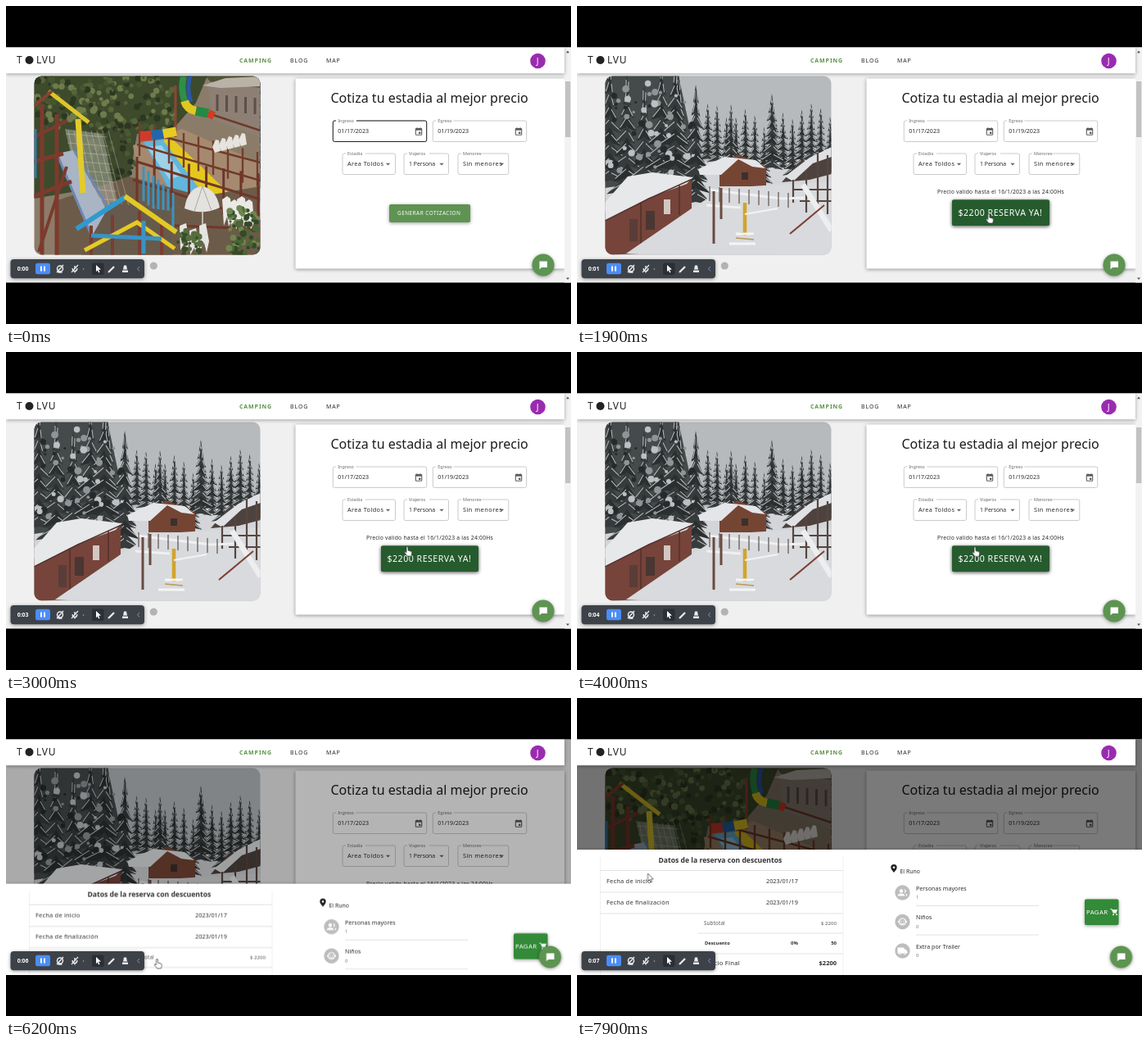
Write an HTML page that moves like this. It is 690 px wide and 388 px high and loops after 8000 ms.

```html
<!DOCTYPE html>
<html lang="es">
<head>
<meta charset="utf-8">
<title>Reserva</title>
<style>
html, body { margin: 0; width: 100%; height: 100%; overflow: hidden; background: #000; }
svg { display: block; width: 690px; height: 388px; font-family: "Noto Sans", "Open Sans", sans-serif; }
text { white-space: pre; }
.soft { filter: drop-shadow(0 1px 2px rgba(0,0,0,.4)); }
.bar { filter: drop-shadow(0 1px 2px rgba(0,0,0,.35)); }
</style>
</head>
<body>
<svg id="stage" viewBox="0 0 690 388"></svg>
<script>
const LOOP = 8000;

let seed = 11;
const rnd = (a = 0, b = 1) => {
  seed = (seed * 16807) % 2147483647;
  return a + (b - a) * seed / 2147483647;
};
const many = (n, fn) => Array.from({ length: n }, (_, i) => fn(i)).join('');

const area = (d, fill) => `<path d="${d}" fill="${fill}"/>`;
const line = (d, color, w = 1) => `<path d="${d}" fill="none" stroke="${color}" stroke-width="${w}"/>`;
const box = (x, y, w, h, fill, r = 0, more = '') =>
  `<rect x="${x}" y="${y}" width="${w}" height="${h}" rx="${r}" fill="${fill}" ${more}/>`;
const dot = (x, y, r, fill) => `<circle cx="${x}" cy="${y}" r="${r}" fill="${fill}"/>`;
const text = (x, y, size, str, { ls = 0, fill = '#2b2b2b', w = 400, end = false } = {}) =>
  `<text x="${x}" y="${y}" font-size="${size}" font-weight="${w}" fill="${fill}" letter-spacing="${ls}"
    ${end ? 'text-anchor="end"' : ''}>${str}</text>`;
const group = (id, body, more = '') => `<g id="${id}" ${more}>${body}</g>`;

// ---- carousel pictures ----
const leaves = (n, x0, y0, x1, y1, colors) => many(n, i =>
  dot(rnd(x0, x1).toFixed(1), rnd(y0, y1).toFixed(1), rnd(1.5, 4.5).toFixed(1), colors[i % colors.length]));

function posts(n, x0, y0, x1, y1, h, color, w) {
  const at = (a, b, i) => a + (b - a) * i / (n - 1);
  return line(many(n, i => `M${at(x0, x1, i)} ${at(y0, y1, i)}v${h}`), color, w);
}

const summer = () =>
  box(34, 85, 277, 219, '#8b7c69') +
  area('M34 85H246L232 118 206 148 160 156 150 215 34 235Z', '#3d4a2c') +
  leaves(190, 36, 87, 205, 150, ['#55653a', '#2c3821', '#6e7b4b', '#46552f']) +
  leaves(60, 100, 140, 160, 215, ['#2a3420', '#4a5833', '#38442a']) +
  area('M243 85H311V100L250 93Z', '#4c5537') +
  area('M246 92 311 100V160L252 138Z', '#8d7f73') +
  area('M240 97 268 88 311 86V98L262 100Z', '#bbb2a7') +
  posts(5, 258, 108, 304, 112, 20, '#5d4f48', 3) +
  area('M155 170 215 150 311 192V260H170Z', '#a58a70') +
  area('M168 166 194 163 247 232 226 246 206 236Z', '#62b5dc') +
  area('M172 172 190 170 215 206 200 212Z', '#9dd2e8') +
  area('M192 164 202 161 278 234 262 247 240 228Z', '#e4c81e') +
  line('M160 151 311 191M160 169 311 213M244 130 311 152', '#6d3a29', 2.4) +
  posts(9, 163, 141, 307, 178, 42, '#743d2b', 2.4) +
  many(5, i => area(`M${252 + i * 8} ${172 - i * 2}l4-9 4 1 2 13-7 2Z`, '#e6e4de')) +
  line('M217 86Q213 101 218 116', '#2e8f47', 8) +
  line('M225 85Q220 103 226 117', '#2857a8', 5) +
  line('M218 116Q221 126 232 128', '#e0c81f', 10) +
  line('M232 128 247 131', '#238a43', 11) +
  line('M247 131 254 134', '#cf3d27', 10) +
  line('M207 97V160', '#8d4632', 3) +
  line('M164 159 178 158', '#cf3b2b', 12) +
  line('M178 158 192 156', '#2465ad', 12) +
  line('M192 156 208 153', '#e5cb22', 11) +
  area('M60 238 150 208 240 232 311 220V304H60Z', '#6d5b49') +
  line('M160 190 311 236M155 212 311 262M205 268 311 272', '#70382a', 3) +
  posts(8, 160, 184, 308, 204, 56, '#6d3528', 3) +
  posts(7, 168, 196, 204, 228, 42, '#3a93c2', 3) +
  area('M72 150 118 156 136 240 96 252Z', 'rgba(190,190,180,.45)') +
  line(many(8, i => `M${76 + i * 7} 152l${18 + i} 92M${73 + i * 2} ${156 + i * 11}l50 4`), 'rgba(220,220,210,.45)', .8) +
  area('M62 180 82 176 138 276 112 298Z', '#a9b4c4') +
  line('M62 180 112 298M83 176 140 272', '#6d88b4', 3) +
  line('M44 120V304M62 132V304M34 190 70 180M34 232 80 214', '#7d3a2d', 5) +
  line('M34 160 75 140M40 300 74 196', '#7d3a2d', 4) +
  line('M52 104 101 142', '#dfc52a', 5) +
  line('M88 138 94 228', '#e2cb2c', 7) +
  line('M34 122 56 104', '#8a402f', 4) +
  line('M36 150V210', '#3777a8', 3) +
  area('M128 240 200 250 204 304H92Z', '#665a4c') +
  line('M104 268V304M130 255V304M163 250V304M190 266V304', '#7a3d30', 4) +
  line('M86 272 146 233', '#2f9ad0', 6) +
  line('M145 232 208 276', '#e3c926', 6) +
  line('M96 298 160 264 206 296', '#e5ca25', 5) +
  line('M104 280 190 284M168 262V302', '#3a93c4', 5) +
  area('M218 247Q222 221 240 220 257 224 261 246Q240 256 218 247Z', '#e3e2df') +
  line('M240 220 230 250M240 220 251 250', '#aaa9a6', 1) +
  line('M240 250V290', '#d8d8d4', 1.5) +
  many(4, i => area(`M${264 + i * 9} ${236 + (i % 2) * 4}l6-4 4 3 2 25-4 9-2-12-4 11Z`, '#e9e9e6')) +
  many(3, i => area(`M${212 + i * 12} ${268 + (i % 2) * 6}l8-3 4 22-3 14-3-12-5 9Z`, '#e4e4e0')) +
  leaves(95, 272, 246, 310, 303, ['#4d6536', '#6f8650', '#35492a']) +
  leaves(32, 208, 272, 238, 303, ['#566d3d', '#3a4c2b']);

function fir(x, top, h, w) {
  const tiers = 9;
  return many(tiers, i => {
    const y = top + h * i / tiers, half = w * (i + 1.4) / tiers / 2, d = h / tiers * 1.5;
    const l = x - half * rnd(.75, 1.1), r = x + half * rnd(.75, 1.1);
    return area(`M${x} ${y}L${r} ${y + d}L${x} ${y + d * .8}L${l} ${y + d * .95}Z`, i % 2 ? '#2b2f30' : '#373b3b') +
      line(`M${x - 1} ${y + d * .3}L${l + 2} ${y + d * .8}M${x + 2} ${y + d * .4}L${r - 2} ${y + d * .85}`, '#b3b7ba', 1.1);
  });
}

const winter = () =>
  box(34, 85, 277, 219, '#b6babd') +
  area('M34 205 150 190 311 185V304H34Z', '#d3d5d8') +
  many(15, i => fir(148 + i * 11.5, rnd(118, 148), 66, 24)) +
  fir(238, 107, 88, 32) + fir(188, 120, 74, 26) +
  area('M34 85H124L140 160 148 206 34 222Z', '#454a4b') +
  many(6, i => fir(40 + i * 21, 70 + (i % 3) * 13, 140, 46)) +
  fir(120, 76, 132, 54) +
  leaves(60, 36, 90, 142, 205, ['#bcc0c3', '#262a2b', '#8f9497']) +
  area('M174 194 196 181 231 196V220H174Z', '#754534') +
  area('M148 199 180 184 218 188 230 198 214 196 197 187 176 206 150 206Z', '#e3e5e8') +
  box(201, 203, 8, 9, '#3c302d') +
  area('M34 252 86 231 140 211V247L76 302 34 304Z', '#76443a') +
  area('M34 240 62 208 92 203 141 209 134 217 88 234 34 262Z', '#e6e8ea') +
  line('M34 262 88 235 141 211', '#54342f', 1.4) +
  box(84, 250, 11, 23, '#4a3633') + box(106, 236, 8, 18, '#d2c7c1') + box(64, 260, 10, 27, '#593d38') +
  line('M78 240V297M125 219V255', '#51302a', 1.5) +
  area('M60 302 140 247 180 222 311 214V304Z', '#d8dadd') +
  area('M250 215 272 190 311 184V205L284 212Z', '#4d423e') +
  area('M254 208 284 185 311 172V184L288 192 264 214Z', '#dfe1e4') +
  line('M264 212V240M280 200V252M294 180V247M306 182V254M264 224H311M272 238H311', '#574640', 2.2) +
  line('M276 218 311 274', '#eceef0', 7) +
  line('M160 224 250 235 278 234M158 243 200 246', '#eff0f2', 3) +
  posts(9, 162, 220, 258, 228, 18, '#6a5b54', 1.3) +
  line('M167 226V290M176 222V260', '#6b4a40', 3) +
  line('M205 240V280', '#d0a52c', 4.5) +
  line('M194 283 216 285M200 277 216 279', '#b99a52', 1.5) +
  line('M186 290H218M194 278H216', '#f5f5f6', 3) +
  line('M260 278 302 243', '#7d4136', 2) +
  line('M205 254 245 247', '#f2f3f4', 2);

// ---- page parts ----
function field(x, y, w, label, value, o = {}) {
  return box(x, y, w, 25.5, 'none', 2, 'stroke="#c6c6c6" stroke-width=".9"') +
    box(x + 4, y - 2, label.length * 3 + 3, 4, '#fff') +
    text(x + 6, y + 1.6, 5.4, label, { fill: '#6b6b6b' }) +
    text(x + 6, y + 15.2, o.size || 7.1, value, { ls: o.ls || 0 });
}
const calendar = (x, y) =>
  box(x - 3.7, y - 3.5, 7.4, 7.8, 'none', .8, 'stroke="#5c5c5c" stroke-width="1.1"') +
  box(x - 3.7, y - 3.5, 7.4, 2.2, '#5c5c5c') + box(x, y + .6, 2.4, 2.4, '#5c5c5c') +
  line(`M${x - 2} ${y - 4.8}v2M${x + 2} ${y - 4.8}v2`, '#5c5c5c');
const caret = (x, y) => area(`M${x - 2.6} ${y - 1.2}h5.2l-2.6 2.7Z`, '#666');

const form =
  box(353.5, 88.5, 328.5, 232, '#fff', 1, 'class="soft"') +
  text(396.5, 117.5, 16, 'Cotiza tu estadia al mejor precio', { fill: '#1c1c1c' }) +
  field(399.3, 140, 114.4, 'Ingreso', '01/17/2023') + calendar(504, 153) +
  group('focus', line('M403 140h-1.7q-2 0-2 2v21.500q0 2 2 2h110.400q2 0 2-2v-21.500q0-2-2-2H428', '#222', 1)) +
  field(521.3, 140, 114.4, 'Egreso', '01/19/2023') + calendar(626, 153) +
  field(411, 180, 64.500, 'Estadia', 'Area Toldos', { size: 7.3, ls: .4 }) + caret(466.5, 193) +
  field(486, 180, 54.5, 'Viajeros', '1 Persona', { size: 6.9 }) + caret(532, 193) +
  field(552, 180, 61.8, 'Menores', 'Sin menores', { size: 7.4, ls: .45 }) + caret(605.5, 193);

const quoteText = text(478, 255, 6.4, 'GENERAR COTIZACION', { fill: '#fff', w: 500, ls: .5 });
const quoteBtn = color => box(468, 242, 99, 22, color, 2, 'class="soft"') + quoteText;
const bookBtn = color => box(458, 236.5, 119, 31.5, color, 2, 'class="soft"') +
  text(465.5, 256.2, 10.6, '$2200 RESERVA YA!', { fill: '#fff', ls: .5 });
const GREEN = '#5f9352', DARK = '#265b2e';

const buttons =
  group('quote', quoteBtn(GREEN)) + group('quoteOver', quoteBtn(DARK)) +
  group('book', text(440, 229, 6.8, 'Precio valido hasta el 16/1/2023 a las 24:00Hs', { ls: .22 }) + bookBtn(GREEN)) +
  group('bookOver', bookBtn(DARK));

const header =
  box(0, 50.5, 682, 31.700, '#fff', 0, 'class="bar"') +
  text(13, 70.3, 12, 'T', { fill: '#222' }) + dot(28.5, 66, 5, '#222') + text(37, 70.3, 12, 'LVU', { fill: '#222', ls: .8 }) +
  text(285, 69, 7, 'CAMPING', { fill: '#5d9147', w: 700, ls: .9 }) +
  text(347, 69, 7, 'BLOG', { ls: .9 }) + text(391, 69, 7, 'MAP', { ls: .9 }) +
  dot(649.5, 67, 9.3, '#9a2bb0') + text(647.8, 70.8, 10.5, 'J', { fill: '#fff' });

const scrollbar =
  box(682, 50.5, 8, 287, '#f2f2f2') + box(683, 92, 6.3, 68, '#c2c2c2') +
  area('M684 57.200h4l-2-2.600Z', '#555') + area('M684 331.500h4l-2 2.600Z', '#555');

// ---- booking drawer ----
const rule = (x0, x1, y) => line(`M${x0} ${y}H${x1}`, '#dfdfdf', .9);
const item = (y, label, n, icon) =>
  dot(397.5, y, 9.2, '#bdbdbd') + `<g transform="translate(397.500 ${y})">${icon}</g>` +
  text(414, y - 2.7, 7, label, { ls: .08 }) + text(414, y + 7.5, 6, n, { fill: '#777' });
const people = dot(-1.5, -2, 2.2, '#fff') + area('M-6 4Q-5.500 1-1.500 1T3 4Z', '#fff') + line('M2.500-3.800Q5-2 2.500 0M4.500 1.500 5.500 4', '#fff', 1.2);
const child = line('M-4 0A4 4 0 1 1 4 0A4 4 0 1 1-4 0M-2 1.600Q0 3.200 2 1.600', '#fff', 1.2) +
  dot(-1.6, -.7, .7, '#fff') + dot(1.6, -.7, .7, '#fff') + dot(-4.6, 0, 1.1, '#fff') + dot(4.6, 0, 1.1, '#fff');
const truck = area('M-6-4H2V-2H4L6 1V3H-6Z', '#fff') + dot(-3, 3, 1.6, '#fff') + dot(3, 3, 1.6, '#fff') +
  dot(-3, 3, .7, '#bdbdbd') + dot(3, 3, .7, '#bdbdbd');
const row = { ls: .18, fill: '#333' }, small = { ls: .2, fill: '#555' };

const drawer =
  box(0, 185, 690, 153, '#fff', 0, 'class="soft"') +
  text(99.5, 200.500, 8.6, 'Datos de la reserva con descuentos', { w: 700, fill: '#333' }) +
  line('M28.500 194V338M325 194V338', '#f0f0f0', .9) +
  rule(28, 325, 210.5) + rule(28, 325, 237) + rule(28, 325, 263) + rule(148, 325, 287) + rule(148, 325, 312) +
  text(36, 225.7, 7.5, 'Fecha de inicio', row) + text(231, 225.7, 7.3, '2023/01/17', { fill: '#333' }) +
  text(36, 252, 7.5, 'Fecha de finalización', row) + text(231, 252, 7.3, '2023/01/19', { fill: '#333' }) +
  text(155, 276.600, 6.2, 'Subtotal', small) + text(317, 276.6, 6.1, '$ 2200', { fill: '#555', end: true }) +
  text(156, 301, 5.8, 'Descuento', { w: 700 }) + text(261, 301, 6, '0%', { w: 700 }) +
  text(317, 301, 6, '50', { w: 700, end: true }) +
  text(155, 326, 7.6, 'Precio Final', { ls: .25 }) + text(317, 326, 7.5, '$2200', { w: 700, end: true }) +
  area('M387 213Q383.300 209 383.300 206.800A3.700 3.700 0 0 1 390.700 206.800Q390.700 209 387 213Z', '#222') + dot(387, 206.8, 1.3, '#fff') +
  text(394.500, 213.5, 6.9, 'El Runo') +
  item(237.5, 'Personas mayores', '1', people) + item(273, 'Niños', '0', child) + item(308.5, 'Extra por Trailer', '0', truck) +
  rule(414, 564, 253.500) + rule(414, 564, 289) +
  box(620, 245.5, 41.5, 31.5, '#338a38', 2, 'class="soft"') +
  text(622, 264, 7.8, 'PAGAR', { fill: '#fff', ls: .35 }) +
  line('M651.500 257.500h1.500l2 4.600h4', '#fff', 1) + area('M653.800 258.200h6.400l-1.700 3.500h-3.400Z', '#fff') +
  dot(655, 264.3, 1, '#fff') + dot(659, 264.3, 1, '#fff');

// ---- floating parts ----
const chat = dot(656, 316, 13.6, '#5e9451') +
  area('M651.500 311.500h9.500v7.500h-7l-2.500 2.300Z', '#fff');

const W = '#e9eaec';
const toolbar =
  box(5.5, 309, 163.5, 23.2, '#3d4249', 4, 'class="soft"') +
  many(8, i => group('sec' + i, text(13.7, 323.2, 6.9, `0:0${i}`, { fill: '#fff', w: 700 }))) +
  box(36, 313.700, 18, 13.5, '#4b8df6', 2.5) + box(42, 317.500, 2, 6, '#fff') + box(46, 317.500, 2, 6, '#fff') +
  line('M62.500 320.500a3.500 3.500 0 1 1 7 0a3.500 3.500 0 1 1-7 0M62 325l8-9M63.500 325h5', W, 1.5) +
  line('M84 317v4M81.200 320q0 3.500 2.800 3.500t2.800-3.500M84 323.500v2', W, 1.5) + line('M80 325l8-9', W, 1.2) +
  dot(94.5, 321, .8, '#aaa') +
  box(105, 313.500, 14.500, 14.5, '#2b2f35', 2) +
  area('M110 316l6 5.500-3 .3 1.500 3-1.300.6-1.400-3-1.800 1.800Z', '#fff') +
  line('M125.500 324.500l6.500-6.500', W, 2.3) + area('M124.500 325.600l.4-2.300 1.800 1.800Z', W) +
  area('M144 316.500h3l1 5h-5ZM142 322.500h7v2.500h-7Z', W) +
  line('M163 318l-2.500 2.700 2.500 2.700', '#8b8fd0', 1);

const arrow = `<path d="M0 0V9.500L2.200 7.500 3.700 11 5.200 10.300 3.800 7H6.700Z" fill="#fff" stroke="#333" stroke-width=".7"/>`;
const hand = `<path d="M-1 1Q0-.500 1 1V5L5 6.200Q6 6.700 5.700 8.500L4.800 12H0L-3.200 7.800Q-3.300 6.300-2 6.600L-1 7.700Z"
  fill="#fff" stroke="#333" stroke-width=".7"/>`;

const slide = (x, body) => `<g transform="translate(${x} 0)"><g clip-path="url(#round)">${body}</g></g>`;

document.getElementById('stage').innerHTML =
  `<defs>
    <clipPath id="page"><rect y="50.500" width="690" height="287"/></clipPath>
    <clipPath id="view"><rect x="34.500" y="85.500" width="276" height="218"/></clipPath>
    <clipPath id="round"><rect x="34.500" y="85.500" width="276" height="218" rx="9"/></clipPath>
  </defs>` +
  box(0, 0, 690, 388, '#000') +
  `<g clip-path="url(#page)">` +
  box(0, 50, 690, 288, '#f0f0f0') +
  `<g clip-path="url(#view)">${group('track', slide(0, summer()) + slide(276, winter()))}</g>` +
  dot(180.3, 317, 4.6, '#b3b3b3') +
  form + buttons + group('scroll', scrollbar) +
  group('shade', box(0, 50, 690, 288, '#000')) +
  header + group('drawer', drawer) + group('chat', chat, 'class="soft"') + toolbar +
  group('mouse', group('arrow', arrow) + group('hand', hand)) +
  `</g>`;

// ---- motion: rows of [ms, value, easing to the next row] ----
function play(id, prop, rows) {
  const all = [...rows];
  if (all[0][0] > 0) all.unshift([0, all[0][1]]);
  const last = all[all.length - 1];
  if (last[0] < LOOP) all.push([LOOP, last[1]]);
  document.getElementById(id).animate(
    all.map(([ms, v, easing = 'linear']) => ({ offset: ms / LOOP, [prop]: v, easing })),
    { duration: LOOP, iterations: Infinity });
}
const shift = (x, y) => `translate(${x}px, ${y}px)`;
const HOLD = 'steps(1, end)';
function show(id, ...spans) {
  const rows = spans.flatMap(([a, b]) => [[a, 1, HOLD], [b, 0, HOLD]]);
  if (rows[0][0] > 0) rows.unshift([0, 0, HOLD]);
  play(id, 'opacity', rows);
}

const OPEN = 6116;
play('track', 'transform', [
  [1455, shift(0, 0), 'ease'], [1805, shift(-276, 0)],
  [6763, shift(-276, 0), 'ease'], [7113, shift(0, 0)]]);
play('drawer', 'transform', [[OPEN, shift(0, 156), 'cubic-bezier(0,0,.2,1)'], [OPEN + 225, shift(0, 0)]]);
play('shade', 'opacity', [[OPEN, 0, 'cubic-bezier(.4,0,.2,1)'], [OPEN + 225, .52]]);
play('chat', 'transform', [[OPEN, shift(0, 0), HOLD], [OPEN + 1, shift(8.500, 0)]]);
show('scroll', [0, OPEN]);

show('focus', [0, 300]);
show('quote', [0, 1800]);
show('quoteOver', [800, 1800]);
show('book', [1800, LOOP]);
show('bookOver', [1800, 4500]);
for (let i = 0; i < 8; i++) show('sec' + i, [i * 1000, (i + 1) * 1000]);

play('mouse', 'transform', [
  [200, shift(470, 162), 'ease-in-out'], [900, shift(503, 253.5)],
  [1850, shift(503, 253.5), 'ease-in-out'], [2300, shift(494.5, 234.5)],
  [3000, shift(490, 237)], [4000, shift(486, 237.5)],
  [4500, shift(470, 234), 'ease-in-out'], [4800, shift(468, 234), 'ease-in-out'],
  [5300, shift(184.5, 318)],
  [6400, shift(184.5, 318), 'ease-in-out'], [6900, shift(204.3, 242.5)],
  [7100, shift(204.3, 242.5), 'ease-in-out'], [7800, shift(86.5, 214)]]);
show('arrow', [200, 800], [4500, 5300], [6300, LOOP]);
show('hand', [800, 4500], [5300, 6300]);
</script>
</body>
</html>
```
